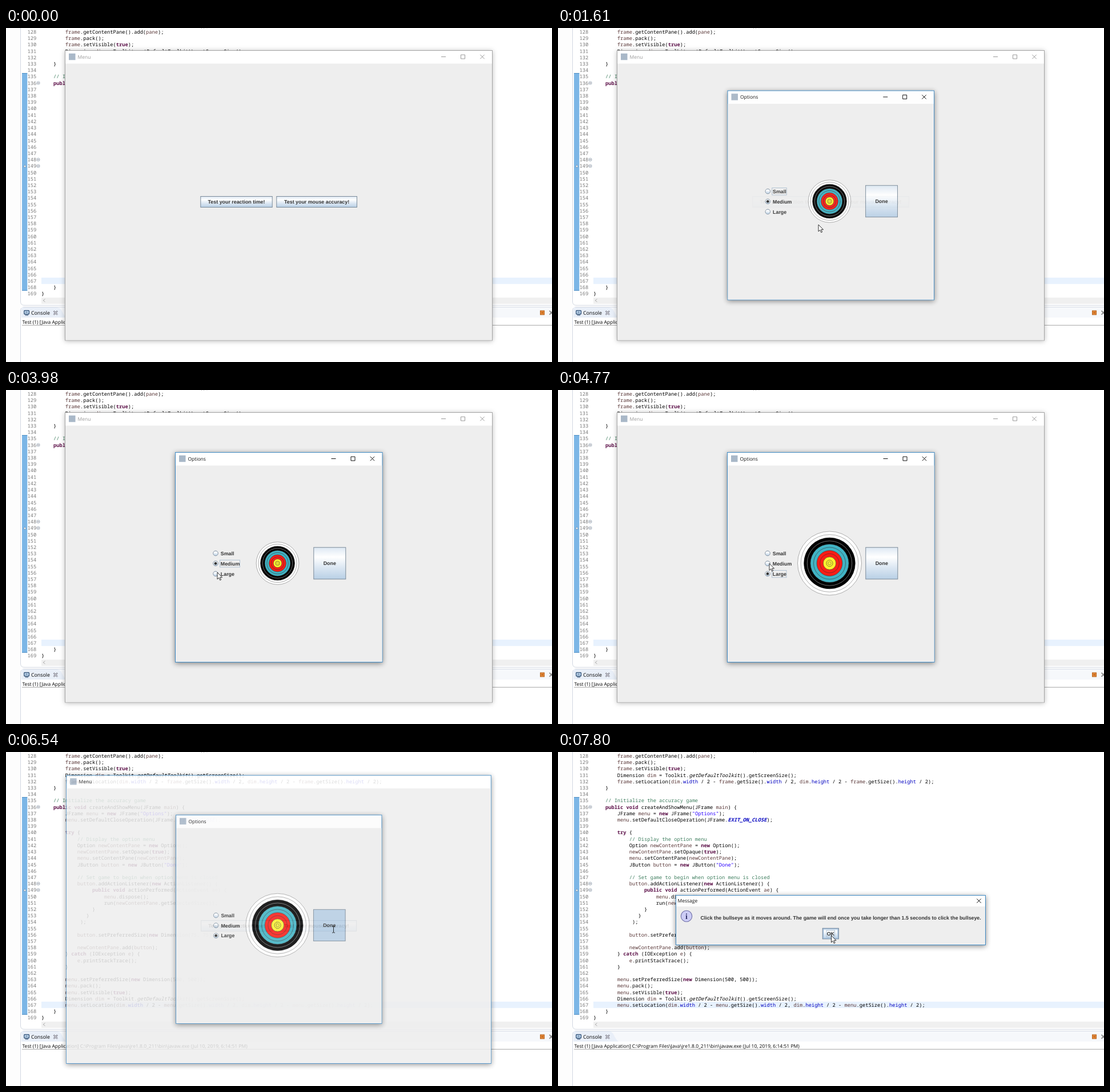
These frames come from a looping animation (956x586 px, 8000 ms). An HTML page:

```html
<!DOCTYPE html>
<html lang="en">
<head>
<meta charset="utf-8">
<title>Accuracy test</title>
<style>
html, body { margin: 0; width: 100%; height: 100%; overflow: hidden; background: #fff; }
svg { display: block; width: 956px; height: 586px; }
text { white-space: pre; text-rendering: geometricPrecision; font: 8.5px "Open Sans", "Noto Sans", sans-serif; }
.code text { font: 8.725px "Noto Sans Mono", "DejaVu Sans Mono", monospace; }
.code .num { fill: #787878; }
.key { fill: #5c1048; font-weight: 600; }
.str { fill: #2a00ff; }
.note { fill: #3f7f5f; }
.field { fill: #0000c0; }
.const { fill: #0000c0; font-weight: bold; font-style: italic; }
.static { font-style: italic; }
.local { fill: #5a3838; }
.ui { font: bold 8.87px "Liberation Sans", Arial, sans-serif; fill: #333; }
.mid { text-anchor: middle; }
.win { transform-box: fill-box; transform-origin: center; }
.back { fill: #fff; stroke: #a4a4a4; filter: drop-shadow(0 1px 4px #0004); }
.title { fill: #999; }
.caps { stroke: #999; fill: none; }
.on .back { stroke: #3f8ac4; filter: drop-shadow(0 2px 5px #0007); }
.on .title { fill: #111; }
.on .caps { stroke: #111; }
.closing .caps { display: none; }
.face { fill: url(#metal); stroke: #7a8a99; }
.ring { fill: none; stroke: #a3bfdc; stroke-width: 1.5; visibility: hidden; }
.hover .ring { visibility: visible; }
.hover .face { stroke: #64788e; }
.down .face { fill: #b8cfe5; }
.down .ring { visibility: hidden; }
.radio .dot, .radio .focus { visibility: hidden; }
.radio.picked .dot, .radio.focused .focus { visibility: visible; }
.focus { fill: none; stroke: #a3b8cc; stroke-width: .8; }
</style>
</head>
<body>
<svg id="stage" viewBox="0 0 956 586"></svg>
<script>
const CODE = `                                                     ();
        frame.getContentPane().add(pane);
        frame.pack();
        frame.setVisible(true);
        Dimension dim = Toolkit.getDefaultToolkit().getScreenSize();
        frame.setLocation(dim.width / 2 - frame.getSize().width / 2, dim.height / 2 - frame.getSize().height / 2);
    }

    // Initialize the accuracy game
    public void createAndShowMenu(JFrame main) {
        JFrame menu = new JFrame("Options");
        menu.setDefaultCloseOperation(JFrame.EXIT_ON_CLOSE);

        try {
            // Display the option menu
            Option newContentPane = new Option();
            newContentPane.setOpaque(true);
            menu.setContentPane(newContentPane);
            JButton button = new JButton("Done");

            // Set game to begin when option menu is closed
            button.addActionListener(new ActionListener() {
                 public void actionPerformed(ActionEvent ae) {
                     menu.dispose();
                     run(newContentPane.getSelectedSize());
                 }
               }
             );

            button.setPreferredSize(new Dimension(75, 75));

            newContentPane.add(button);
        } catch (IOException e) {
            e.printStackTrace();
        }

        menu.setPreferredSize(new Dimension(500, 500));
        menu.pack();
        menu.setVisible(true);
        Dimension dim = Toolkit.getDefaultToolkit().getScreenSize();
        menu.setLocation(dim.width / 2 - menu.getSize().width / 2, dim.height / 2 - menu.getSize().height / 2);
    }
}`.split('\n');

const RULES = [
  ['note', '//.*'], ['str', '"[^"]*"'],
  ['key', '\\b(?:public|void|new|try|catch|true)\\b'],
  ['const', 'EXIT_ON_CLOSE'], ['static', 'getDefaultToolkit'],
  ['field', '\\b(?:width|height)\\b'],
  ['local', '\\b(?:frame|pane|dim|main|menu|newContentPane|button|ae|e)\\b']
];
const TOKEN = new RegExp(RULES.map(([name, re]) => `(?<${name}>${re})`).join('|'), 'g');
const paint = line => line.replace(TOKEN, (word, ...rest) => {
  const groups = rest.at(-1);
  return `<tspan class="${Object.keys(groups).find(k => groups[k])}">${word}</tspan>`;
});

const rect = (x, y, w, h, attrs) => `<rect x="${x}" y="${y}" width="${w}" height="${h}" ${attrs}/>`;
const path = (d, attrs) => `<path d="${d}" ${attrs}/>`;
const circle = (x, y, r, attrs) => `<circle cx="${x}" cy="${y}" r="${r}" ${attrs}/>`;
const text = (x, y, str, cls = '') => `<text x="${x}" y="${y}" class="${cls}">${str}</text>`;
const rowY = n => 10 + 11.207 * (n - 128);

function editor() {
  let s = rect(0, 0, 25, 586, 'fill="#fdfdfd"')
    + path('M25.5 0V480Q25.5 486.5 32 486.5H956M25.5 586V496Q25.5 489.5 32 489.5H956', 'fill="none" stroke="#d3d8e2"')
    + rect(62, 438, 894, 11.2, 'fill="#e8f2fe"')
    + rect(28, 79, 9.3, 381.5, 'fill="#7cb6e6"')
    + path('M28 79.5H37.3M28 460.5H37.3', 'stroke="#4f8fc4"')
    + rect(62, 473, 894, 11, 'fill="#f0f0f0"')
    + path('M68.5 475.5L65 478L68.5 480.5', 'fill="none" stroke="#a8a8a8" stroke-width=".9"')
    + path('M30.5 244L33 240L35.5 244Z', 'fill="#fff" stroke="#6d8aa5" stroke-width=".7"');
  CODE.forEach((line, i) => {
    const n = 127 + i;
    s += text(62, rowY(n), paint(line));
    if (i) s += text(37.5, rowY(n), n, 'num');
  });
  for (const n of [136, 148, 149]) {
    s += circle(56.5, rowY(n) - 3.2, 2.6, 'fill="#fff" stroke="#8a9aaa" stroke-width=".8"')
      + path(`M55 ${rowY(n) - 3.2}h3`, 'stroke="#667" stroke-width=".8"');
  }
  return `<g class="code">${s}</g>`;
}

function consoleView() {
  return rect(27, 490, 929, 18, 'fill="#f6f8fb"')
    + path('M27 509V494Q27 490 32 490H88Q95 490 98 497T106 508Z', 'fill="#e9eff8"')
    + rect(26, 508, 930, 78, 'fill="#fff"')
    + rect(31.8, 495.6, 8.6, 6.4, 'rx="1" fill="#c9e0f6" stroke="#29496f" stroke-width="1.3"')
    + path('M33.5 504H39M34 498.5H38', 'stroke="#29496f"')
    + `<text x="44" y="502.7" style="font-size:8.8px">Console</text>`
    + path('M83.5 496.5L90 503M90 496.5L83.5 503', 'stroke="#667" stroke-width="2.4"')
    + path('M83.5 496.5L90 503M90 496.5L83.5 503', 'stroke="#fff" stroke-width="1"')
    + text(28.5, 519.3, 'Test (1) [Java Application] C:\\Program Files\\Java\\jre1.8.0_211\\bin\\javaw.exe (Jul 10, 2019, 6:14:51 PM)')
    + path('M28 521.5H956', 'stroke="#aaa"')
    + rect(935.5, 496, 7, 7, 'fill="#e58a3c" stroke="#b5621b"') + rect(937.5, 498, 3, 3, 'fill="#c76d1f"')
    + path('M951.5 496L958 503M958 496L951.5 503', 'stroke="#888" stroke-width="1.8"');
}

function win(id, x, y, w, h, bar, title, body, full = true) {
  const r = x + w, c = y + 11;
  const cross = (cx, cy) => `M${cx - 3.7} ${cy - 3.7}l7.4 7.4m0 -7.4l-7.4 7.4`;
  return `<g id="${id}" class="win">` + rect(x, y, w, h, 'class="back"')
    + rect(x + .5, y + bar, w - 1, h - bar - .5, 'fill="#eee"')
    + (full ? rect(x + 6.5, c - 5.8, 11.5, 11.5, 'fill="#a9b8c8"') : '')
    + text(x + (full ? 22 : 3), y + (full ? 14.4 : 12.5), title, 'title')
    + path(full
        ? `M${r - 89.5} ${c}h8M${r - 55} ${c - 3.5}h7v7h-7z` + cross(r - 17.5, c)
        : cross(r - 11.5, y + 9.7), 'class="caps"')
    + body + '</g>';
}

const button = (id, x, y, w, h, label) => `<g id="${id}">` + rect(x, y, w, h, 'class="face"')
  + rect(x + 1.2, y + 1.2, w - 2.4, h - 2.4, 'class="ring"')
  + text(x + w / 2, y + h / 2 + 3.2, label, 'ui mid') + '</g>';

const radio = (id, y, label, w) => `<g id="${id}" class="radio">`
  + circle(367, y, 4.3, 'fill="url(#metal)" stroke="#7a8a99" stroke-width=".9"')
  + circle(367, y, 2.4, 'class="dot" fill="#333"')
  + rect(374.5, y - 6, w, 12.5, 'class="focus"')
  + text(375.8, y + 3.3, label, 'ui') + '</g>';

function target() {
  const fills = ['#fff', '#000', '#41b4c5', '#fc1d16', '#fff32e'];
  let s = '';
  for (let k = 10; k > 0; k--) {
    const line = k === 7 ? '#bbb' : k === 8 ? '#000' : k > 8 ? '#777' : '#333';
    s += circle(0, 0, 5.6 * k, `fill="${fills[(10 - k) >> 1]}" stroke="${line}" stroke-width=".6" vector-effect="non-scaling-stroke"`);
  }
  return `<g id="target">${s}${circle(0, 0, 2.8, 'fill="none" stroke="#555" stroke-width=".6"')}</g>`;
}

const stage = document.getElementById('stage');
stage.innerHTML = `<defs><linearGradient id="metal" x2="0" y2="1">
  <stop stop-color="#dde8f3"/><stop offset=".3" stop-color="#fff"/>
  <stop offset=".62" stop-color="#dde8f3"/><stop offset="1" stop-color="#b8cfe5"/></linearGradient></defs>`
  + editor() + consoleView()
  + win('menu', 103.5, 39.5, 748, 508.5, 23, 'Menu',
      button('reaction', 340.8, 295.5, 125.4, 19, 'Test your reaction time!')
      + button('accuracy', 473.8, 295.5, 140.6, 19, 'Test your mouse accuracy!'))
  + win('options', 296.5, 109.5, 362.5, 368, 23, 'Options',
      radio('small', 286.5, 'Small', 25.5) + radio('medium', 304.3, 'Medium', 35) + radio('large', 322.4, 'Large', 25.5)
      + target() + button('done', 538.8, 276.2, 56, 55.6, 'Done'))
  + win('message', 206.5, 251.5, 542, 87, 19.5, 'Message',
      circle(225, 288, 9.7, 'fill="#ccccf5" stroke="#6f6fa8" stroke-width="1.1"')
      + `<text x="225" y="293" class="mid" style="font:bold 14px 'Liberation Serif',serif;fill:#33336b">i</text>`
      + `<text x="249.5" y="293.6" class="ui" style="font-size:8.82px">Click the bullseye as it moves around. The game will end once you take longer than 1.5 seconds to click the bullseye.</text>`
      + button('ok', 463.3, 309.3, 28, 18.6, 'OK')
      + rect(470, 313, 14.6, 11.5, 'class="focus"'), false)
  + `<g id="cursor">${path('M0 0V12l2.8-2.6 1.9 4.3 1.9-.8-1.9-4.2h3.8z', 'id="arrow" fill="#fff" stroke="#000" stroke-width=".8"')}
     ${path('M-2.5-5.5H-.8L0-5 .8-5.5H2.5M0-5V5M-2.5 5.5H-.8L0 5 .8 5.5H2.5', 'id="beam" fill="none" stroke="#000" stroke-width=".8"')}</g>`;

const $ = Object.fromEntries([...stage.querySelectorAll('g[id],path[id]')].map(n => [n.id, n]));
const flag = (node, name, on) => node.classList.toggle(name, on);
const show = (node, on) => node.style.display = on ? '' : 'none';
const clamp = v => Math.max(0, Math.min(1, v));

// time, x, y of the pointer tip
const TRACK = [
  [30, 800, 557], [620, 442, 304], [820, 511, 300], [950, 512, 299], [1260, 512, 299],
  [1600, 456, 345], [1800, 457, 345], [2550, 366, 283], [2820, 366, 284], [3150, 357, 293],
  [3480, 367, 302], [3690, 368, 303], [3960, 370, 320], [4490, 370, 321], [5050, 370, 288],
  [5840, 370, 289], [6330, 572, 309], [6540, 573.5, 311.5], [6630, 573, 311],
  [6860, 541, 297], [7010, 541, 297], [7800, 478.5, 322]
];

function pointer(t) {
  const i = TRACK.findIndex(p => p[0] > t);
  if (i < 1) return TRACK.at(i ? -1 : 0).slice(1);
  const [a, b] = [TRACK[i - 1], TRACK[i]];
  const u = (t - a[0]) / (b[0] - a[0]), e = u * u * (3 - 2 * u);
  return [a[1] + (b[1] - a[1]) * e, a[2] + (b[2] - a[2]) * e];
}

// windows grow and fade in while opening, shrink and fade out while closing
function pose(node, t, open, close) {
  const i = 1 - clamp((t - open) / 230), o = clamp((t - close) / 210);
  show(node, t >= open && o < 1);
  node.style.transform = `scale(${1 - .1 * i * i - .1 * o * o})`;
  node.style.opacity = (1 - 1.6 * i * i) * (1 - o ** 1.4);
  flag(node, 'closing', o > 0);
}

const CLICK = 1150, OPEN = 1420, CLOSE = 6490, NOTICE = 6630;

function draw() {
  const t = performance.now() % 8000, [x, y] = pointer(t);
  const over = (left, top, w, h) => x > left && x < left + w && y > top && y < top + h;

  pose($.menu, t, -300, CLOSE);
  pose($.options, t, OPEN, CLOSE);
  pose($.message, t, NOTICE, 9000);
  flag($.menu, 'on', t >= CLICK && t < OPEN || t >= CLOSE);
  flag($.options, 'on', true);
  flag($.message, 'on', true);

  flag($.reaction, 'hover', t < OPEN && over(341, 295, 125, 19));
  flag($.accuracy, 'hover', t < OPEN && over(474, 295, 140, 19));
  flag($.accuracy, 'down', t >= CLICK && t < CLICK + 100);
  flag($.done, 'hover', t < CLOSE && over(539, 276, 56, 56));
  flag($.done, 'down', t >= 6420);
  flag($.ok, 'hover', true);

  const size = t < 2820 ? 'medium' : t < 3500 ? 'small' : t < 4120 ? 'medium' : 'large';
  const focus = t < 2820 ? 'small' : t < 6420 ? size : '';
  for (const id of ['small', 'medium', 'large']) {
    flag($[id], 'picked', id === size);
    flag($[id], 'focused', id === focus);
  }
  const scale = { small: 1 / 3, medium: 2 / 3, large: 1 }[size];
  $.target.setAttribute('transform', `translate(475.5 304) scale(${scale})`);

  const typing = t >= CLOSE && t < NOTICE + 20;
  show($.cursor, t >= 30);
  show($.arrow, !typing);
  show($.beam, typing);
  $.cursor.setAttribute('transform', `translate(${x} ${y})`);
  requestAnimationFrame(draw);
}
draw();
</script>
</body>
</html>
```
